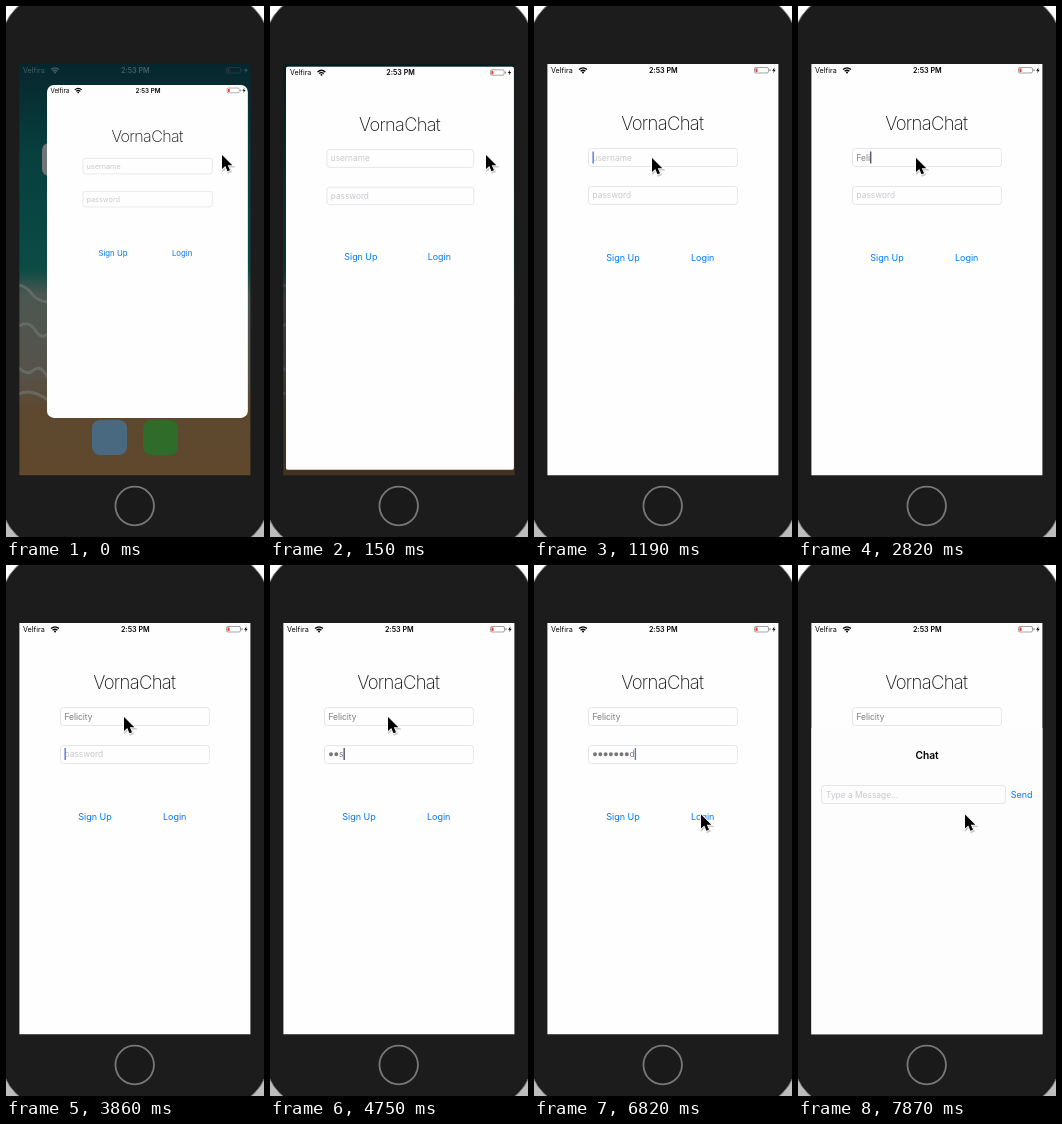
An HTML page that plays this animation: 258 px wide and 531 px high, repeating every 8 s.

```html
<!DOCTYPE html>
<html lang="en">
<head>
<meta charset="utf-8">
<style>
html, body { margin: 0; height: 100%; overflow: hidden; background: linear-gradient(#fff 50%, #bcbcbc); }
svg { display: block; width: 258px; height: 531px; font: 8.4px Inter, sans-serif; }
.bar { font-size: 7.2px; }
.bold { font-weight: 600; }
.mid { text-anchor: middle; }
.link { font-size: 9px; fill: #007aff; }
.hint { fill: #c9c9ce; }
.typed { fill: #7c7c7c; }
.field { fill: none; stroke: #e6e6e6; }
.title { font-size: 18.5px; font-weight: 200; letter-spacing: -.7px; fill: #111; }
</style>
</head>
<body>
<svg viewBox="0 0 258 531">
  <defs>
    <linearGradient id="beach" x1="0" y1="0" x2="0" y2="1">
      <stop offset="0" stop-color="#06262d"/>
      <stop offset=".22" stop-color="#073f3f"/>
      <stop offset=".5" stop-color="#0b4c45"/>
      <stop offset=".56" stop-color="#4c5752"/>
      <stop offset=".75" stop-color="#56524a"/>
      <stop offset=".84" stop-color="#5d482f"/>
      <stop offset="1" stop-color="#60482c"/>
    </linearGradient>
    <clipPath id="screen"><rect x="13.4" y="58" width="231" height="411.3"/></clipPath>
    <clipPath id="window"><rect id="windowShape" x="13" y="58" width="231.4"/></clipPath>
    <g id="status" fill="currentColor">
      <text class="bar" x="17" y="67">Velfira</text>
      <path d="M45 63.6Q49 60.2 53 63.6M46.6 65.3Q49 63.2 51.4 65.3" fill="none" stroke="currentColor" stroke-width="1.3"/>
      <circle cx="49" cy="66.6" r="1"/>
      <text class="bar bold mid" x="129.3" y="67">2:53 PM</text>
      <rect x="220.5" y="61.5" width="14" height="5.5" rx="1.5" fill="none" stroke="currentColor" stroke-width=".8" opacity=".45"/>
      <path d="M236 63.2v2" stroke="currentColor" opacity=".5"/>
      <rect x="221.5" y="62.5" width="2" height="3.5" fill="#ff3b30"/>
      <path d="M240.6 61.3l-2.4 3.4h1.6l-.6 2.6 2.4-3.5H240z"/>
    </g>
    <path id="arrow" d="M0 0V14L3.3 11 5.5 16.3 8 15.2 5.8 10.2H10.3Z"/>
  </defs>

  <rect x="-5" y="-12" width="268" height="555" rx="50" fill="#1c1c1c" stroke="#888"/>
  <circle cx="128.7" cy="500" r="19.3" fill="#1a1a1a" stroke="#777" stroke-width="1.8"/>

  <g clip-path="url(#screen)">
    <g id="home">
      <rect x="13" y="58" width="232" height="412" fill="url(#beach)"/>
      <path d="M13 279q8 2 13 9t16 8M13 320q10 -6 16 4t13 4M13 362q8 8 15 2t14 8M13 388q12 -6 29 6" fill="none" stroke="#737873" stroke-width="3" opacity=".6"/>
      <use href="#status" color="#fff" opacity=".25"/>
      <rect x="36" y="137" width="34" height="33" rx="7" fill="#707575"/>
      <rect x="86" y="414" width="35" height="35" rx="8" fill="#48697f"/>
      <rect x="137" y="414" width="35" height="35" rx="8" fill="#2f6b29"/>
      <rect id="shade" x="13" y="58" width="232" height="412"/>
    </g>

    <g id="app" clip-path="url(#window)">
      <rect x="13" y="58" width="232" height="412" fill="#fefefe"/>
      <use href="#status" color="#000"/>
      <circle id="spinner" cx="61" cy="64.5" r="2.8" stroke="#777" stroke-width=".9" stroke-dasharray="1.2 1.3" fill="none"/>
      <text class="title mid" x="128.3" y="124">VornaChat</text>
      <rect class="field" x="54.5" y="142.5" width="149" height="18" rx="3"/>
      <rect class="field" x="54.5" y="180.5" width="149" height="18" rx="3"/>
      <text class="hint" id="nameHint" x="58.5" y="154.5">username</text>
      <text class="hint" id="passHint" x="58.5" y="192.3">password</text>
      <text class="typed" id="name" x="58.5" y="154.5"></text>
      <path id="dots" stroke="#777" stroke-width="4" stroke-linecap="round" stroke-dasharray="0 5.3"/>
      <text class="typed" id="letter" y="192.3"></text>
      <text class="link mid" x="89" y="254.5">Sign Up</text>
      <text class="link mid" x="168.7" y="254.5">Login</text>
      <rect id="caret" width="1.3" height="12"/>
      <g id="chat">
        <rect x="13" y="163" width="232" height="307" fill="#fdfdfd"/>
        <text class="bold mid" font-size="10.2" x="129" y="193.5">Chat</text>
        <rect class="field" x="23.5" y="220.5" width="184" height="18" rx="3"/>
        <text class="hint" x="28" y="232.5">Type a Message...</text>
        <text class="link" x="212.7" y="232.8">Send</text>
      </g>
    </g>
  </g>

  <g id="mouse">
    <use href="#arrow" x=".8" y="1.2" opacity=".2" stroke="#000" stroke-width="2"/>
    <use href="#arrow" stroke="#fff" stroke-width="1.6" paint-order="stroke"/>
  </g>
</svg>
<script>
const LOOP = 8000, LEFT = 58.5, PITCH = 5.3;
const BLUE = '#4a6cec', DARK = '#4a4a58';
const $ = id => document.getElementById(id);
const set = (id, attrs) => {
  for (const key in attrs) $(id).setAttribute(key, attrs[key]);
};
const show = (id, on) => $(id).style.display = on ? '' : 'none';

// Each row is [start time, ...values]; values hold until the next row.
const launch = [[0, 41, 79, .868, 383.5, 8], [150, 16, 60.4, .985, 409.6, 2], [300, 13, 58, 1, 412, 0]];
const pointer = [
  [0, 216, 149], [450, 206, 149], [600, 160, 151], [740, 118, 152],
  [5940, 123, 240.5], [6080, 128, 270], [6230, 142, 283], [6380, 159, 283],
  [6530, 169, 268], [6670, 168, 255], [6820, 167, 249.5]
];
const names = [[0, 0], [2530, 1], [2670, 2], [2820, 4], [2970, 5], [3120, 7], [3270, 8]];
const secrets = [
  [0, 0, ''], [4460, 0, 'p'], [4600, 1, 'a'], [4750, 2, 's'], [5050, 3, 's'],
  [5190, 5, 'o'], [5340, 6, 'r'], [5640, 7, 'd']
];
const blinks = [
  [0, BLUE, 0], [740, BLUE, .5], [890, BLUE, 0], [1190, BLUE, 1], [1790, BLUE, .5], [1930, BLUE, 0],
  [2230, BLUE, 1], [2530, DARK, 1], [3860, BLUE, 1], [4460, DARK, 1], [5940, BLUE, .6],
  [6080, BLUE, 0], [6380, BLUE, 1], [6970, BLUE, .5], [7120, BLUE, 0], [7270, BLUE, 1]
];
const at = (rows, t) => rows.findLast(row => row[0] <= t).slice(1);

function draw(t) {
  const [x, y, scale, height, radius] = at(launch, t);
  set('app', { transform: `translate(${x - 13 * scale} ${y - 58 * scale}) scale(${scale})` });
  set('windowShape', { height, rx: radius });
  set('shade', { opacity: t < 150 ? 0 : .3 });
  show('home', t < 300);

  set('mouse', { transform: `translate(${at(pointer, t)})` });

  const [typed] = at(names, t);
  $('name').textContent = 'Felicity'.slice(0, typed);
  show('nameHint', !typed);

  const [count, last] = at(secrets, t);
  const letterX = LEFT + PITCH * count;
  set('dots', { d: count ? `M61 189.3h${PITCH * (count - .5)}` : '' });
  set('letter', { x: letterX });
  $('letter').textContent = last;
  show('passHint', !last);

  const [fill, opacity] = at(blinks, t);
  const onName = t < 3860;
  const end = onName ? LEFT + $('name').getComputedTextLength() : letterX + $('letter').getComputedTextLength();
  set('caret', { x: end, y: onName ? 145.5 : 183, fill, opacity });

  show('spinner', t >= 7570 && t < 7870);
  set('spinner', { transform: `rotate(${t < 7720 ? 0 : 30} 61 64.5)` });
  show('chat', t >= 7870);
}

function tick() {
  draw(performance.now() % LOOP);
  requestAnimationFrame(tick);
}
tick();
</script>
</body>
</html>
```
